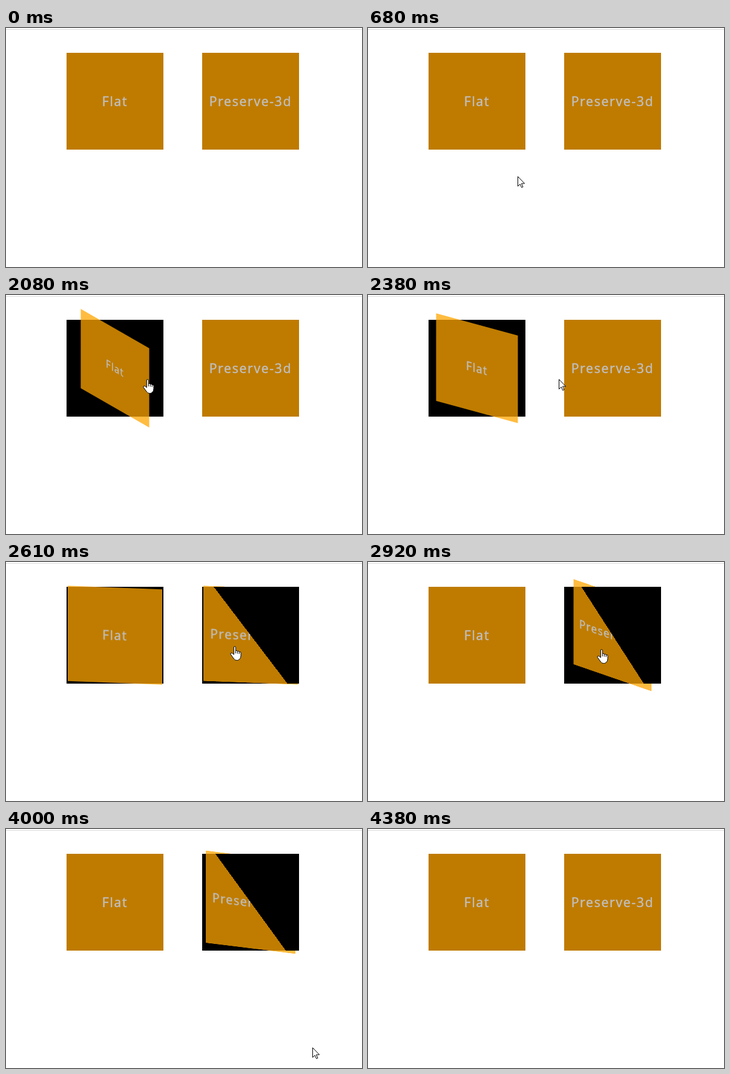
These frames come from a looping animation (588x395 px, 4.53 s). An HTML page:

```html
<!DOCTYPE html>
<html lang="en">
<head>
<meta charset="utf-8">
<title>Flat and preserve-3d</title>
<style>
  html, body { margin: 0; width: 100%; height: 100%; overflow: hidden; background: #fff; }
  .rule { position: absolute; left: 0; top: 2px; width: 100%; height: 1px; background: #dcdcdc; }
  .box { position: absolute; top: 41px; width: 160px; height: 160px; background: #000; }
  .card {
    width: 160px; height: 160px; background: orange; color: #fff; opacity: .75;
    font: 21px/160px "Open Sans", "Noto Sans", sans-serif; -webkit-text-stroke: .5px #fff;
    letter-spacing: 1.8px; text-align: center; white-space: nowrap;
  }
  #flat { left: 100px; }
  #deep { left: 324px; transform-style: preserve-3d; }
  svg { position: absolute; left: 0; top: 0; width: 588px; height: 395px; z-index: 2; pointer-events: none; }
  svg path { fill: #fff; stroke: #000; stroke-linejoin: round; }
</style>
</head>
<body>
<div class="rule"></div>
<div class="box" id="flat"><div class="card">Flat</div></div>
<div class="box" id="deep"><div class="card">Preserve-3d</div></div>
<svg viewBox="0 0 588 395">
  <g id="arrow"><path d="M.5.5V16.5L4.2 13L6.7 18.6L9 17.6L6.5 12H11.6Z"/></g>
  <g id="hand">
    <path d="M-.7 14V2.1a1.5 1.5 0 0 1 3 0V7.6q2.7-1 3 .9q2.6-.8 2.9 1q2.8-.6 2.8 1.8V16q0 4-2.6 6q-1.6 1.5-4 1.5q-3.4 0-5-2.5L-6 13.5q-.5-2 1.4-2.2q1.7.2 3.9 2.7"/>
    <path style="fill:none" d="M2.3 7.6V12M5.3 8.5V12.5M8.2 9.5V13"/>
  </g>
</svg>
<script>
const LOOP = 4530, STEP = 77, FIRST_STEP = 287, POSE_DELAY = 8;
const DURATION = 1000, SETTLED = 0.67;

const cards = [
  { box: document.getElementById("flat"), x: 100, enter: 906, leave: 2181 },
  { box: document.getElementById("deep"), x: 324, enter: 2410, leave: 3696 }
];

const line = (from, to) => [from, from.map((v, i) => (v + to[i]) / 2), to];

// Pointer moves along quadratic curves and rests in between.
const moves = [
  { start: 295, end: 757, curve: [[409, 360], [230, 327], [247, 207]] },
  { start: 757, end: 1290, curve: line([247, 207], [231, 139]) },
  { start: 2066, end: 2605, curve: line([233, 139], [377, 139]) },
  { start: 2605, end: 3640, curve: line([377, 139], [403, 156]) },
  { start: 3640, end: 4140, curve: [[403, 156], [430, 339], [590, 417]] }
];
const arrow = document.getElementById("arrow"), hand = document.getElementById("hand");

// CSS "ease": cubic-bezier(.25, .1, .25, 1)
function ease(t) {
  if (t <= 0) return 0;
  if (t >= SETTLED) return 1;
  let low = 0, high = 1;
  for (let i = 0; i < 24; i++) {
    const mid = (low + high) / 2;
    if (0.75 * mid * (1 - mid) + mid ** 3 < t) low = mid; else high = mid;
  }
  return 0.3 * low * (1 - low) ** 2 + 3 * low * low * (1 - low) + low ** 3;
}

function pointerAt(time) {
  const move = moves.findLast(({ start }) => time >= start);
  if (!move || time >= moves.at(-1).end) return null;
  const k = Math.min(1, (time - move.start) / (move.end - move.start));
  const [from, bend, to] = move.curve;
  return from.map((v, i) => Math.round(v * (1 - k) ** 2 + 2 * bend[i] * k * (1 - k) + to[i] * k * k));
}

function show(cursor, visible, position) {
  cursor.style.display = visible ? "" : "none";
  if (visible) cursor.setAttribute("transform", `translate(${position})`);
}

function draw(time) {
  for (const { box, enter, leave } of cards) {
    const turn = ease((time - enter) / DURATION) - ease((time - leave) / DURATION);
    box.firstChild.style.transform = turn ? `rotateX(${35 * turn}deg) rotateY(${45 * turn}deg)` : "none";
  }
  const pos = pointerAt(time);
  const over = pos && cards.some(({ x }) => pos[0] >= x && pos[0] < x + 160 && pos[1] >= 41 && pos[1] < 201);
  show(arrow, pos && !over, pos);
  show(hand, over, pos);
}

const start = performance.now();
function frame() {
  const time = (performance.now() - start) % LOOP;
  const step = Math.floor((time - FIRST_STEP) / STEP);
  draw(FIRST_STEP + step * STEP + POSE_DELAY);
  requestAnimationFrame(frame);
}
frame();
</script>
</body>
</html>
```
